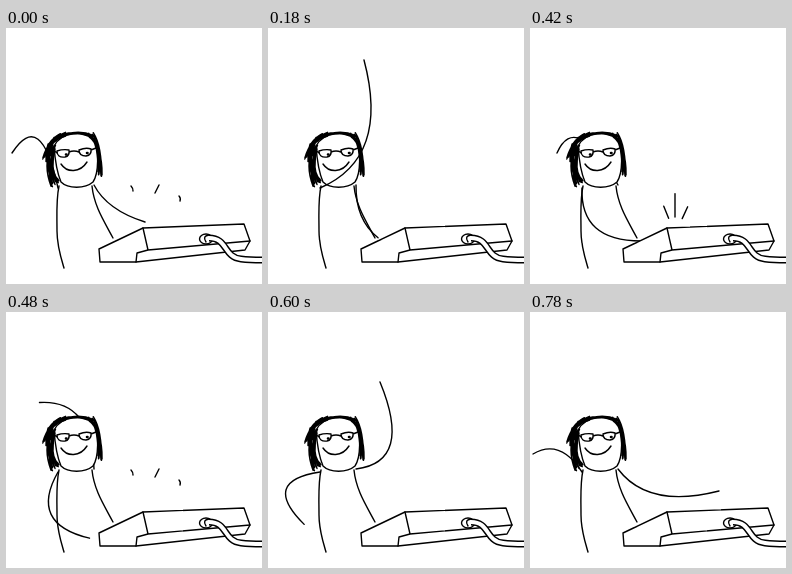
Recreate the animation shown at these times as an HTML page. Size 256 by 256 pixels, loop 0.84 s.

```html
<!DOCTYPE html>
<html lang="en">
<head>
<meta charset="utf-8">
<title>Keyboard player</title>
<style>
  html, body { margin: 0; width: 100%; height: 100%; overflow: hidden; background: #fff; }
  svg { display: block; width: 100vw; height: 100vh; }
  .ink { fill: none; stroke: #000; stroke-width: 1.4; stroke-linecap: round; stroke-linejoin: round; }
  .paper { fill: #fff; }
</style>
</head>
<body>
<svg viewBox="0 0 256 256">
  <defs><path id="cord" d="M203 210C222 210 217 229 235 231Q244 232 258 232"/></defs>
  <g class="ink">
    <g id="back"></g>
    <path d="M53 158C50 172 51 186 51 203C51 218 55 230 58 240M86 158C88 178 98 193 107 210"/>
    <path class="paper" d="M48 118C49 132 52 147 55 154C62 161 79 161 87 154C93 145 93 122 88 111C78 103 56 103 48 118Z"/>
    <path id="hair"/>
    <path d="M51 123Q57 121 63 122Q64 128 59 129Q51 130 51 123ZM73 122Q80 119 85 121Q86 127 80 128Q73 128 73 122ZM63 124Q68 122 73 124M51 125L46 121M85 122L90 120"/>
    <path stroke-width="2.600" d="M60 126.500h.5M81 125h.5"/>
    <path d="M55 136C61 145 74 145 81 134"/>
    <g id="front"></g>
    <path class="paper" d="M93 221L137 200L238 196L244 213L239 222L130 234H94Z"/>
    <path d="M137 200L142 222L244 213M142 222L131 225L130 234"/>
    <ellipse class="paper" cx="200" cy="211" rx="6.500" ry="5"/>
    <use href="#cord" stroke-width="6.800" stroke-linecap="butt"/>
    <use href="#cord" stroke="#fff" stroke-width="4"/>
    <path d="M203 207Q196 208 200 214"/>
    <path id="left"/>
    <path id="right"/>
    <path id="sparks"/>
  </g>
</svg>
<script>
const STEP = 60, COUNT = 14;
const el = id => document.getElementById(id);

// Hand and elbow positions at a few steps of the swing.
const arms = {
  left: {
    shoulder: [52, 160],
    keys: {
      0: [6, 125, 35, 80], 2: [42, 72, 125, 102], 3: [96, 32, 122, 130], 5: [156, 141, 125, 214],
      7: [111, 213, 50, 213], 9: [57, 226, 3, 202], 11: [20, 191, -8, 136], 13: [3, 142, 30, 126]
    },
    behind: step => step < 2 || step > 9
  },
  right: {
    shoulder: [88, 157],
    keys: {
      0: [139, 194, 101, 182], 2: [110, 203, 86, 187], 5: [107, 210, 89, 187], 7: [27, 125, 46, 82],
      9: [60, 65, 136, 113], 10: [112, 70, 145, 150], 11: [148, 101, 149, 177], 13: [189, 179, 118, 197]
    },
    behind: step => step > 5 && step < 9
  }
};

// Smooth closed curve through the keys.
function pose(keys, step) {
  const times = Object.keys(keys).map(Number), n = times.length;
  const at = i => {
    const k = (i + n) % n;
    return { t: times[k] + COUNT * Math.floor(i / n), p: keys[times[k]] };
  };
  const i = times.filter(t => t <= step).length - 1;
  const [a, b, c, d] = [-1, 0, 1, 2].map(o => at(i + o));
  const span = c.t - b.t, u = (step - b.t) / span, v = 1 - u;
  return b.p.map((from, j) => {
    const to = c.p[j];
    const out = (to - a.p[j]) / (c.t - a.t) * span;
    const into = (d.p[j] - from) / (d.t - b.t) * span;
    return v * v * (1 + 2 * u) * from + u * u * (1 + 2 * v) * to + u * v * (v * out - u * into);
  });
}

function drawArm(id, step) {
  const { shoulder, keys, behind } = arms[id];
  const [x, y, ex, ey] = pose(keys, step);
  el(id).setAttribute("d", `M${shoulder}Q${ex} ${ey} ${x} ${y}`);
  el(behind(step) ? "back" : "front").append(el(id));
}

// Short strokes fly outwards from the keys.
function sparks(distance, length) {
  return [-112, -90, -65].map(deg => {
    const a = deg * Math.PI / 180, c = Math.cos(a), s = Math.sin(a);
    const size = deg === -90 ? length * 1.8 : length;
    return `M${145 + c * distance} ${206 + s * distance}l${c * size} ${s * size}`;
  }).join("");
}

function sparkPath(step) {
  if (step === 7) return sparks(17, 13);
  if (step === 0 || step === 8) return "M125 158Q127 160 127 163M153 157L149 165M173 168Q175 170 174 173";
  return "";
}

let seed = 7;
function jitter(size) {
  seed = seed * 16807 % 2147483647;
  return (seed / 2147483647 - .5) * size;
}

// A lock is a bundle of loose strokes along one bend.
function lock(points, count, spread) {
  let d = "";
  for (let i = 0; i < count; i++) {
    const [a, b, c] = points.map(([x, y]) => `${x + jitter(spread)} ${y + jitter(spread)}`);
    d += `M${a}Q${b} ${c}`;
  }
  return d;
}

el("hair").setAttribute("d",
  lock([[57, 107], [40, 113], [39, 131]], 9, 6) +
  lock([[46, 118], [40, 137], [49, 155]], 16, 8) +
  lock([[48, 111], [66, 100], [87, 109]], 6, 4) +
  lock([[85, 107], [95, 118], [94, 146]], 9, 5));

let shown = -1;
function draw(now) {
  const step = Math.floor(now / STEP) % COUNT;
  if (step === shown) return;
  shown = step;
  drawArm("left", step);
  drawArm("right", step);
  el("sparks").setAttribute("d", sparkPath(step));
}

const start = performance.now();
function tick() {
  draw(performance.now() - start);
  requestAnimationFrame(tick);
}
tick();
</script>
</body>
</html>
```
